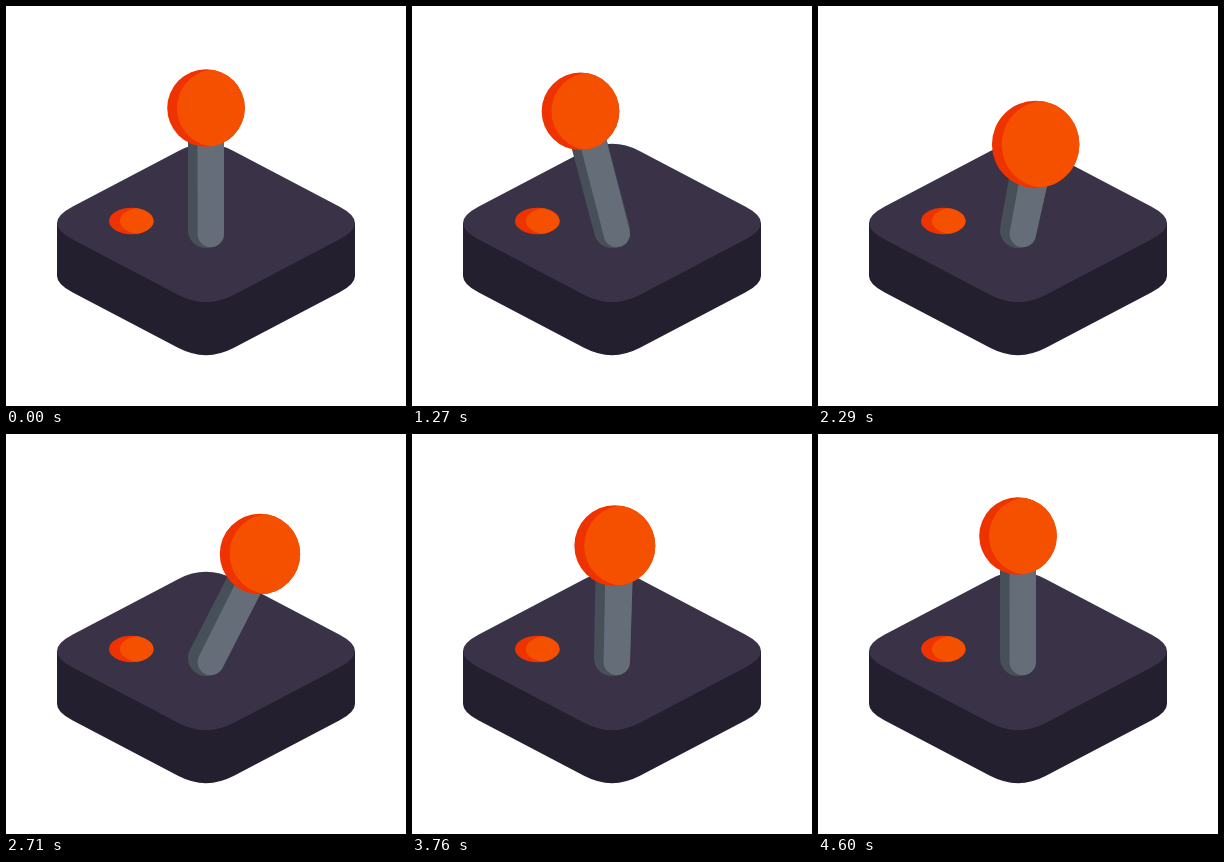
An HTML page with a canvas for the animation above (4630 ms loop, 400x400 px).

```html
<!DOCTYPE html>
<html lang="en">
<head>
<meta charset="utf-8">
<title>Joystick</title>
<style>
html, body { margin: 0; width: 100%; height: 100%; overflow: hidden; background: #fff; }
canvas { display: block; width: 400px; height: 400px; }
</style>
</head>
<body>
<canvas id="stage" width="400" height="400"></canvas>
<script>
const ctx = document.getElementById('stage').getContext('2d');
const TAU = Math.PI * 2;
const LOOP = 4630, REST = 1000, STEP = 30;
const LEAN = 500, CIRCLE = 2100, SETTLE = 1000;
const SWEEP = 279, REACH = 56, BALL = 38.8;
const PIVOT = { x: 200, y: 224 };
const COLORS = {
  top: '#3a3347', side: '#231f2e',
  stick: '#656e78', stickShade: '#475059',
  red: '#f55000', redShade: '#ee3300'
};

const elasticOut = p => p >= 1 ? 1 :
  1 + 2 ** (-10 * p) * Math.sin((p - 0.075) * TAU / 0.3);

function onCircle(p) {
  const degrees = SWEEP * p + 4 * Math.sin(Math.PI * p) ** 2;
  const angle = degrees * Math.PI / 180;
  return { side: -Math.cos(angle), front: Math.sin(angle) };
}

// Lean of the stick: side is left/right, front is towards the viewer.
function leanAt(time) {
  if (time < LEAN) {
    return { side: -(1 - Math.cos(Math.PI * time / LEAN)) / 2, front: 0 };
  }
  time -= LEAN;
  if (time < CIRCLE) return onCircle(time / CIRCLE);
  const left = 1 - elasticOut((time - CIRCLE) / SETTLE);
  const end = onCircle(1);
  return { side: end.side * left, front: end.front * left };
}

function ballFor({ side, front }) {
  const near = front > 0;
  return {
    x: 200 + REACH * side,
    y: 102 + 10.8 * (side * side + front * front) + front * (near ? 27 : 9),
    r: BALL + front * (near ? 5.2 : 10.6)
  };
}

function ellipse(x, y, rx, ry, color) {
  ctx.fillStyle = color;
  ctx.beginPath();
  ctx.ellipse(x, y, rx, ry, 0, 0, TAU);
  ctx.fill();
}

function shadedEllipse(x, y, rx, ry, shift) {
  ellipse(x, y, rx, ry, COLORS.redShade);
  ctx.save();
  ctx.clip();
  ellipse(x + shift, y, rx, ry, COLORS.red);
  ctx.restore();
}

function roundedDiamond(dy, color) {
  const slope = 0.525, cy = 217 + dy;
  const tipX = 164.8, tipY = 86.5;
  const nearX = 28, farX = 133.2;
  const edge = x => tipY - x * slope;
  ctx.fillStyle = color;
  ctx.beginPath();
  ctx.moveTo(200 - nearX, cy - edge(nearX));
  ctx.quadraticCurveTo(200, cy - tipY, 200 + nearX, cy - edge(nearX));
  ctx.lineTo(200 + farX, cy - edge(farX));
  ctx.quadraticCurveTo(200 + tipX, cy, 200 + farX, cy + edge(farX));
  ctx.lineTo(200 + nearX, cy + edge(nearX));
  ctx.quadraticCurveTo(200, cy + tipY, 200 - nearX, cy + edge(nearX));
  ctx.lineTo(200 - farX, cy + edge(farX));
  ctx.quadraticCurveTo(200 - tipX, cy, 200 - farX, cy - edge(farX));
  ctx.fill();
}

function drawBase() {
  roundedDiamond(53, COLORS.side);
  ctx.fillRect(51, 217, 298, 53);
  roundedDiamond(0, COLORS.top);
  shadedEllipse(125.3, 215, 22.3, 13.2, 10.8);
}

// Tapered bar with a round lower end.
function bar(x, y, radius, topX, topY, topRadius, angle, color) {
  const c = Math.cos(angle), s = Math.sin(angle);
  ctx.fillStyle = color;
  ctx.beginPath();
  ctx.moveTo(topX + c * topRadius, topY + s * topRadius);
  ctx.lineTo(x + c * radius, y + s * radius);
  ctx.arc(x, y, radius, angle, angle + Math.PI);
  ctx.lineTo(topX - c * topRadius, topY - s * topRadius);
  ctx.fill();
}

function drawStick(ball) {
  const scale = ball.r / BALL;
  const angle = Math.atan2(ball.x - PIVOT.x, PIVOT.y - ball.y);
  const shift = 4.7 * scale;
  bar(PIVOT.x, PIVOT.y, 18, ball.x, ball.y, 18 * scale, angle, COLORS.stickShade);
  bar(204.8, 228, 13.2,
    ball.x + Math.cos(angle) * shift, ball.y + Math.sin(angle) * shift,
    13.3 * scale, angle, COLORS.stick);
}

function draw(now) {
  const t = now % LOOP;
  const time = Math.max(0, Math.floor((t - REST) / STEP) * STEP);
  const ball = ballFor(leanAt(time));
  ctx.fillStyle = '#fff';
  ctx.fillRect(0, 0, 400, 400);
  drawBase();
  drawStick(ball);
  shadedEllipse(ball.x, ball.y, ball.r, ball.r, 9.8);
}

let start;
function tick(now) {
  start ??= now;
  draw(now - start);
  requestAnimationFrame(tick);
}
draw(0);
requestAnimationFrame(tick);
</script>
</body>
</html>
```
